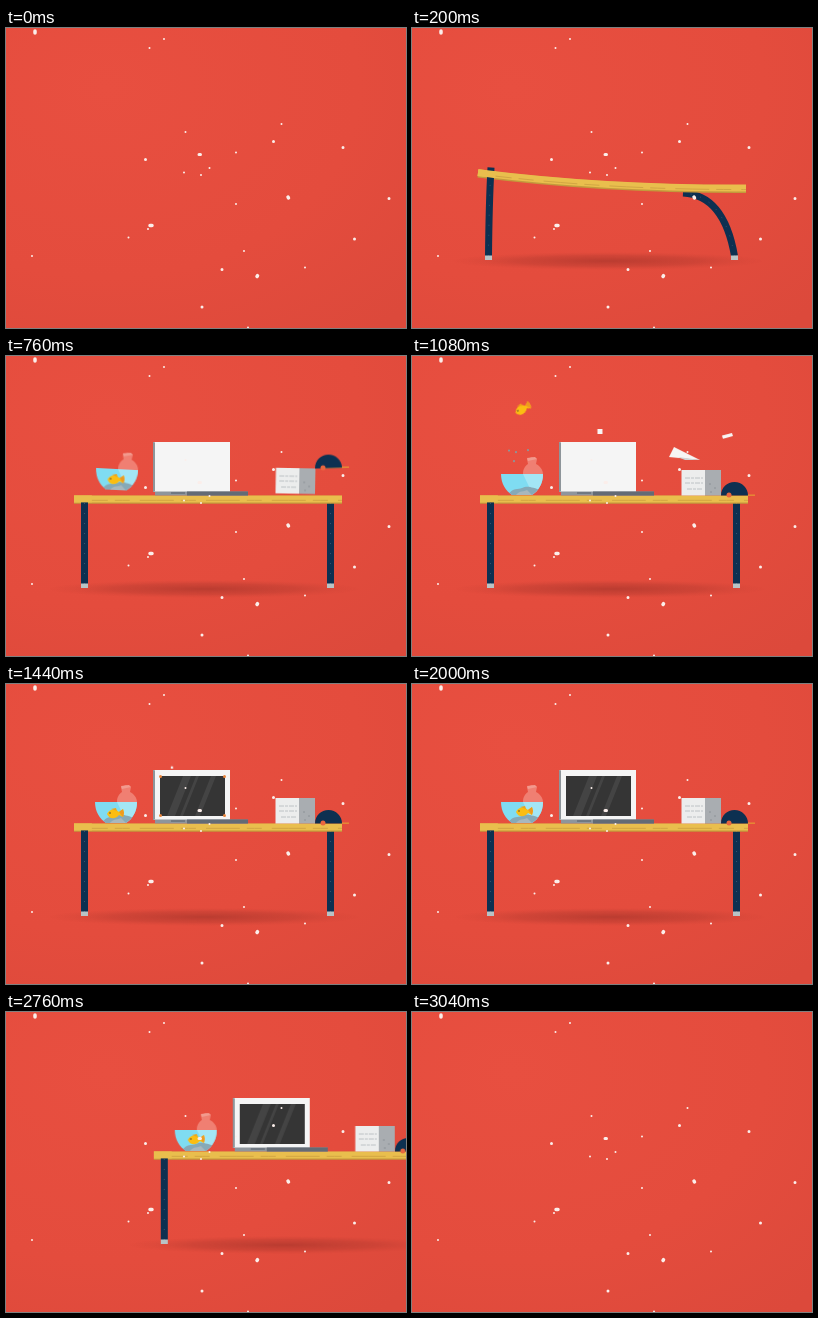
Write an HTML page that moves like this. It is 400 by 300 pixels and loops after 3080 ms.

```html
<!DOCTYPE html>
<html lang="en">
<head>
<meta charset="utf-8">
<title>Desk</title>
<style>
html, body { margin: 0; width: 100%; height: 100%; overflow: hidden; background: #e44c3d; }
svg { display: block; width: 400px; height: 300px; }
svg * { animation-duration: 3080ms; animation-iteration-count: infinite; animation-timing-function: linear; animation-fill-mode: both; }

/* slide in from the left, rush out to the right */
.desk { animation-name: slide; }
@keyframes slide {
  0%, 1.3% { transform: translateX(-400px); animation-timing-function: cubic-bezier(.25,.5,.5,1); }
  8.5% { transform: translateX(22px); animation-timing-function: ease-in-out; }
  12.8%, 75.32% { transform: translateX(0); }
  79.22% { transform: translateX(.6px); }
  81.82% { transform: translateX(4px); }
  84.42% { transform: translateX(14px); }
  87.01% { transform: translateX(37px); }
  89.61% { transform: translateX(79px); }
  90.91% { transform: translateX(110px); }
  92.21% { transform: translateX(149px); }
  94.81% { transform: translateX(255px); }
  97.4%, 100% { transform: translateX(410px); }
}

/* bending wood and legs */
.top { fill: none; animation-name: sag; }
@keyframes sag {
  0%, 12.99% { d: path("M68 145Q196 161 336 160.5"); animation-timing-function: ease-in; }
  15.58% { d: path("M68 143Q200 136 336 140"); }
  18.18% { d: path("M68 143.5Q200 147 336 144"); }
  20.78%, 100% { d: path("M68 143.3Q200 143.3 336 143.3"); }
}
.leg { fill: none; stroke: #0d3051; stroke-width: 7; }
.dots { fill: none; stroke: #34536e; stroke-width: 1; stroke-dasharray: 1 9; }
.left { animation-name: leftLeg; }
@keyframes leftLeg {
  0%, 12.99% { d: path("M78.5 228Q79 175 81 139.5"); }
  15.58% { d: path("M78.5 228Q77 185 77.5 146"); }
  18.18%, 100% { d: path("M78.5 228Q78.5 187 78.5 146"); }
}
.right { animation-name: rightLeg; }
@keyframes rightLeg {
  0%, 12.99% { d: path("M324.5 228Q314 167 273 165"); animation-timing-function: ease-in; }
  15.58% { d: path("M324.5 228Q329 186 327 143"); }
  18.18% { d: path("M324.5 228Q322 187 323 146"); }
  20.78%, 100% { d: path("M324.5 228Q324.5 187 324.5 146"); }
}

/* things falling onto the desk */
.laptop { transform-origin: 195.5px 137px; animation-name: fall; }
@keyframes fall {
  0%, 9.09% { transform: translate(-8px,-210px) rotate(20deg); animation-timing-function: cubic-bezier(.4,.3,.7,.7); }
  12.99% { transform: translate(-5px,-114px) rotate(14.8deg); animation-timing-function: cubic-bezier(.33,.25,.67,.6); }
  16.88% { transform: none; }
  18.5% { transform: translateY(-4px) rotate(-2deg); }
  20.78%, 100% { transform: none; }
}
.lid { transform-origin: 147px 136px; animation-name: lean; }
@keyframes lean {
  0%, 12.99% { transform: skewX(-17deg); }
  17.5% { transform: skewX(8deg); }
  19.5% { transform: skewX(-3deg); }
  21.5%, 100% { transform: none; }
}
.drop { animation-name: drop; }
@keyframes drop {
  0%, 17.5% { transform: translateY(-170px) rotate(-12deg); animation-timing-function: cubic-bezier(.4,.2,.8,.7); }
  22.7% { transform: none; }
  24.7% { transform: translateY(-5px) rotate(3deg); }
  26.6%, 100% { transform: none; }
}
.bowl { transform-origin: 110px 139px; }
.stack { transform-origin: 289px 139px; animation-delay: 40ms; }
.tape { transform-origin: 323px 139px; animation-delay: 80ms; }
.shards { animation-name: shards; }
@keyframes shards {
  0%, 9.09% { transform: translateY(-70px); }
  12.99% { transform: none; opacity: 1; }
  16.5% { transform: translate(4px,98px); opacity: 1; }
  16.6%, 100% { transform: translate(4px,98px); opacity: 0; }
}

/* the jolt throws light things up */
.hop { --up: cubic-bezier(.33,.67,.67,1); --down: cubic-bezier(.33,0,.67,.33); }
.fish { transform-origin: 107px 129px; animation-name: leap; }
@keyframes leap {
  0%, 27.92% { transform: none; animation-timing-function: var(--up); }
  35.71% { transform: translate(2px,-75px) rotate(-28deg); animation-timing-function: var(--down); }
  42.86% { transform: translate(0,4px) rotate(10deg); animation-timing-function: ease-out; }
  46.75% { transform: translate(0,1px); animation-timing-function: ease-in-out; }
  64.94% { transform: translate(3px,-1px); animation-timing-function: ease-in-out; }
  81.82%, 100% { transform: translate(1px,-1px); }
}
.drops { animation-name: splash; }
@keyframes splash {
  0%, 28.5% { transform: translateY(26px); opacity: 0; animation-timing-function: var(--up); }
  29% { transform: translateY(24px); opacity: 1; animation-timing-function: var(--up); }
  35.06% { transform: none; animation-timing-function: var(--down); }
  40% { transform: translateY(24px); opacity: 1; }
  40.3%, 100% { transform: translateY(24px); opacity: 0; }
}
.plane { transform-origin: 272px 99px; animation-name: glide; }
@keyframes glide {
  0%, 28% { transform: translate(10px,20px) scaleY(.1); opacity: 0; }
  28.1% { transform: translate(10px,17px) scaleY(.2); opacity: 1; animation-timing-function: var(--up); }
  35.06% { transform: none; animation-timing-function: var(--down); }
  42.8% { transform: translate(10px,16px) rotate(-8deg) scaleY(.2); opacity: 1; }
  42.9%, 100% { transform: translate(10px,16px) scaleY(.1); opacity: 0; }
}
.slip { transform-origin: 315px 80px; animation-name: slip; }
@keyframes slip {
  0%, 28% { transform: translate(-16px,36px) rotate(60deg); opacity: 0; }
  28.1% { transform: translate(-16px,34px) rotate(60deg); opacity: 1; animation-timing-function: var(--up); }
  35.06% { transform: none; animation-timing-function: var(--down); }
  42.8% { transform: translate(-16px,34px) rotate(-30deg); opacity: 1; }
  42.9%, 100% { transform: translate(-16px,34px); opacity: 0; }
}
.chip { transform-origin: 188px 75.5px; animation-name: chip; }
@keyframes chip {
  0%, 28% { transform: translateY(14px); opacity: 0; }
  28.1% { transform: translateY(14px); opacity: 1; animation-timing-function: var(--up); }
  35.06% { transform: none; animation-timing-function: var(--down); }
  41% { transform: translate(-12px,9px) rotate(-60deg) scale(.6); }
  46.75% { transform: translate(-22px,8px) rotate(-90deg) scale(.45); opacity: 1; }
  49%, 100% { transform: translate(-26px,10px) scale(.2); opacity: 0; }
}

/* screen */
.screen { transform-origin: 187px 112px; animation-name: wake; }
@keyframes wake {
  0%, 37.6% { transform: scale(0); animation-timing-function: ease-out; }
  42.8%, 100% { transform: none; }
}
.screws { animation-name: screws; }
@keyframes screws {
  0%, 41.5% { opacity: 0; }
  43%, 50% { opacity: 1; }
  53.25%, 100% { opacity: 0; }
}
</style>
</head>
<body>
<svg viewBox="0 0 400 300">
  <defs>
    <radialGradient id="wall" cx=".25" cy=".2" r="1.05">
      <stop offset="0" stop-color="#e84f40"/>
      <stop offset=".6" stop-color="#e44c3d"/>
      <stop offset="1" stop-color="#dc493b"/>
    </radialGradient>
    <radialGradient id="shade">
      <stop offset="0" stop-color="#a8352b" stop-opacity=".7"/>
      <stop offset=".6" stop-color="#b33a2f" stop-opacity=".4"/>
      <stop offset="1" stop-color="#c84336" stop-opacity="0"/>
    </radialGradient>
    <clipPath id="panel"><path d="M154 92h65v40h-65z"/></clipPath>
    <clipPath id="water"><path d="M89 118h42c0 10-5 17-11 21h-20c-6-4-11-11-11-21z"/></clipPath>
  </defs>
  <rect width="400" height="300" fill="url(#wall)"/>

  <g class="desk">
    <ellipse cx="198" cy="233" rx="155" ry="9" fill="url(#shade)"/>
    <path class="leg right"/>
    <path class="dots right"/>
    <path class="top" stroke="#c39a3c" stroke-width="8" transform="translate(0 .5)"/>
    <path class="top" stroke="#e9be4d" stroke-width="7" transform="translate(0 -.4)"/>
    <path class="top" stroke="#d2a643" stroke-width="1" stroke-dasharray="34 7 15 10" transform="translate(0 1)"/>
    <path class="leg left"/>
    <path class="dots left"/>
    <path class="top" stroke="#e9be4d" stroke-width="7" stroke-dasharray="18 300" transform="translate(0 -.4)"/>
    <path d="M75 227.500h7v4.500h-7zM321 227.500h7v4.500h-7z" fill="#b9c3c6"/>

    <g class="shards" fill="#f7f5f4">
      <path d="M164.500 31l5.500 1.500-3 10.500-5-1.500z"/>
      <path d="M181 24l2 .6-4.500 16-2-.6z"/>
    </g>

    <g class="hop"><path class="chip" d="M185.500 73h5v5h-5z" fill="#f7f5f4"/></g>
    <g class="laptop">
      <g class="lid">
        <path d="M147 86h6v50h-6z" fill="#9ba0a5"/>
        <path d="M148.500 86H224v50h-75.500z" fill="#f5f5f5"/>
        <path d="M147 86.500h2v49h-2z" fill="#8e959a"/>
        <g class="screen">
          <path d="M154 92h65v40h-65z" fill="#353535"/>
          <path d="M177 92h8l-16 40h-8zM190 92h3l-16 40h-3zM205 92h5l-16 40h-5z" fill="#444" clip-path="url(#panel)"/>
        </g>
        <path class="screws" d="M154.500 92.500h0m64 0h0m0 39h0m-64 0h0" stroke="#e9843b" stroke-width="3" stroke-linecap="round"/>
      </g>
      <path d="M149 135.500h93v4h-93z" fill="#8e959c"/>
      <path d="M181 135.500h61v4h-61z" fill="#636b75"/>
      <path d="M165 137h14" stroke="#535c68"/>
    </g>

    <g class="drop bowl hop">
      <path d="M111 118c0-5 2-8 5-10l-1-5 5-2 5 2-1 5c4 2 7 6 7 10z" fill="#f07f72"/>
      <path d="M115 102l8-1 2 2-9 2z" fill="#f29a8e"/>
      <g clip-path="url(#water)">
        <path d="M88 117h44v23H88z" fill="#7fdcf2"/>
        <path d="M111 118h20v21h-10z" fill="#a3e6f5"/>
        <path d="M96 139c5-8 10-5 14-7 6-3 10 0 20 2v6z" fill="#86a9b7"/>
        <path d="M104 139c4-5 8-3 11-5l5 5z" fill="#a8b7bd"/>
      </g>
      <g class="drops"><path d="M97 94.500h0m7 1.500h0m12-2h0m-14 11h0" stroke="#79a6ae" stroke-width="2" stroke-linecap="round"/></g>
      <g class="fish">
        <path d="M101 129c2-5 8-6 12-2l4-3 1 4-1 4-4-2c-4 5-10 4-12-1z" fill="#fbbd12"/>
        <path d="M113 127l4-3 1 4-1 4z" fill="#ee9a20"/>
        <path d="M105 124l5-1 1 3z" fill="#f0a418"/>
        <circle cx="104" cy="128" r=".8" fill="#4b4536"/>
      </g>
    </g>

    <g class="drop stack">
      <path d="M269.500 114H293v25.500h-23.500z" fill="#eceded"/>
      <path d="M293 114h16v25.500h-16z" fill="#a9adb1"/>
      <path d="M273 122h18m-18 5h18m-16 6h15" fill="none" stroke="#bdc2c5" stroke-dasharray="5 1 3 1"/>
      <path d="M297 128h2m3 4h2m-6 4h2" stroke="#8c9297"/>
    </g>
    <g class="drop tape">
      <path d="M316 139.200h27" stroke="#e58a35" stroke-width="1.500"/>
      <path d="M309 139.500c0-8 6-13.500 13.500-13.500S336 132 336 139.500z" fill="#0d3051"/>
      <circle cx="317" cy="139" r="2.500" fill="#e8663f"/>
    </g>

    <g class="hop" fill="#f7f5f4">
      <g class="plane">
        <path d="M262 91l26 13-31-3z"/>
        <path d="M266 101l22 3-15 0z" fill="#cfd0d1"/>
      </g>
      <path class="slip" d="M310 79.500l10-2.500 1 3-10 2.800z"/>
    </g>
  </g>

  <g fill="none" stroke="#fbeeea" stroke-linecap="round">
    <path stroke-width="3.500" d="M29 3v2M282 169l.5 1M251 248.500l.5-.8M144 197.500h2"/>
    <path stroke-width="3" d="M267.500 113.500h0M337 119.500h0M383 170.500h0M139.500 131.500h0M193 126.500h1.500M196 279h0M348.500 211h0M216 241.500h0"/>
    <path stroke-width="2" d="M143.500 20h0M158 11h0M179.500 104h0M230 124.500h0M203.500 140h0M195 147h0M178 144.500h0M230 176h0M122.500 209.500h0M142 201h0M238 223h0M299 239.500h0M26 228h0M275.500 96h0M242 299.500h0"/>
  </g>
</svg>
</body>
</html>
```
